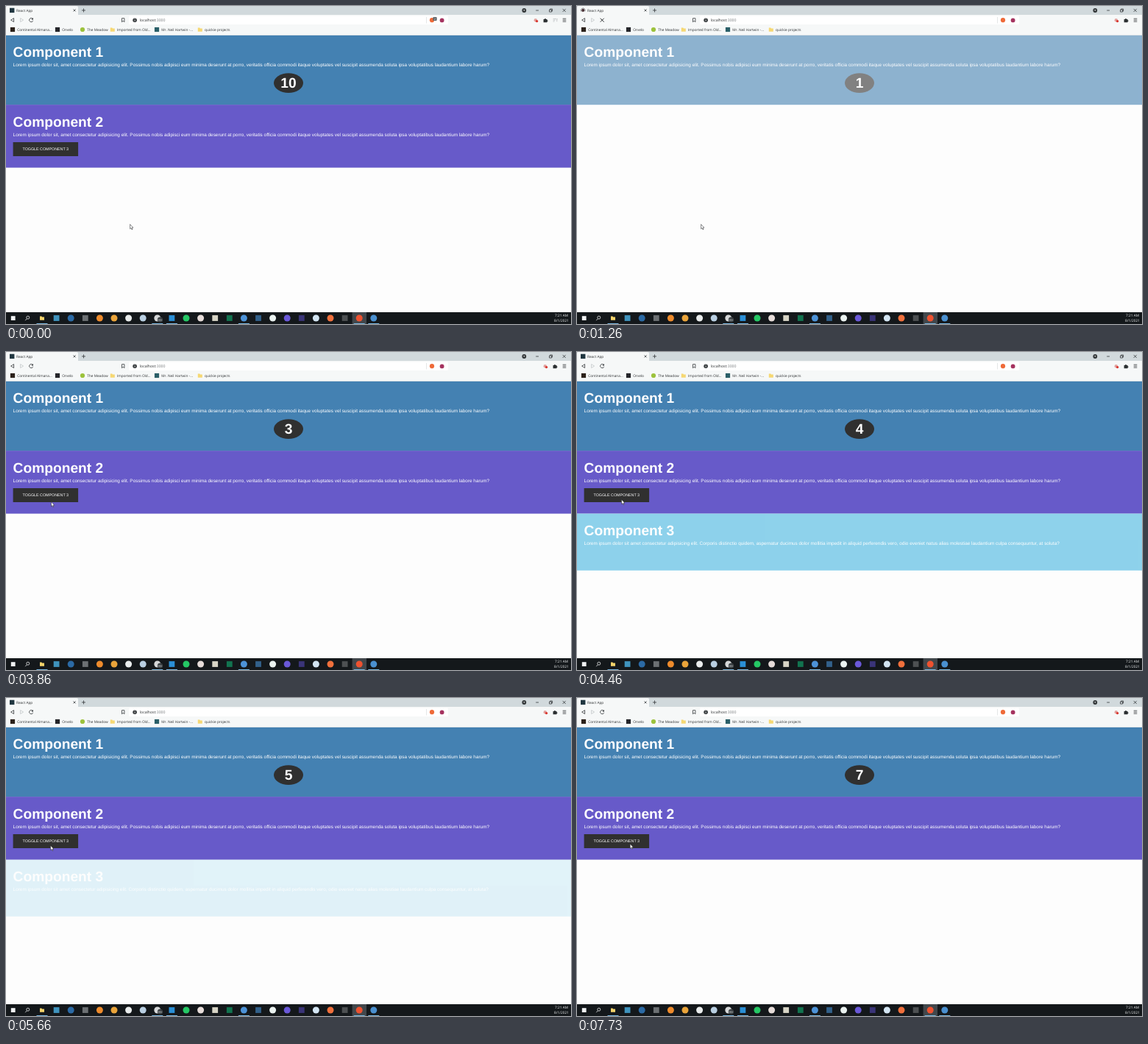
Recreate the animation shown at these times as an HTML page. Size 768x432 px, loop 8 s.

```html
<!DOCTYPE html>
<html lang="en">
<head>
<meta charset="utf-8">
<title>React App</title>
<style>
html, body { margin: 0; width: 100%; height: 100%; overflow: hidden; background: #fdfdfd; }
svg { display: block; width: 768px; height: 432px; text-rendering: geometricPrecision; }
.ui { font-family: "Open Sans", "Noto Sans", sans-serif; font-size: 4.75px; fill: #2c2f31; }
.page { font-family: "Liberation Sans", Arial, sans-serif; font-size: 6.4px; fill: #fff; }
.title { font-size: 19.2px; font-weight: bold; }
.line { fill: none; stroke: #34383a; stroke-width: .8; }
</style>
</head>
<body>
<svg viewBox="0 0 768 432">
  <rect width="768" height="432" fill="#fdfdfd"/>

  <g class="page">
    <g id="one">
      <rect y="39.6" width="768" height="94.6" fill="#4481b2"/>
      <text class="title" x="9.6" y="69.2">Component 1</text>
      <text class="lorem" x="9.6" y="82.3"></text>
      <ellipse cx="384" cy="104.6" rx="20" ry="13.3" fill="#303030"/>
      <text id="count" class="title" x="384" y="111.3" text-anchor="middle">10</text>
    </g>
    <g id="two">
      <rect y="134.1" width="768" height="85.5" fill="#675ac9"/>
      <text class="title" x="9.6" y="163.6">Component 2</text>
      <text class="lorem" x="9.6" y="176.7"></text>
      <rect x="9.6" y="185" width="88.5" height="19" fill="#303030"/>
      <text x="53.8" y="196.4" font-size="5.33" text-anchor="middle">TOGGLE COMPONENT 3</text>
    </g>
    <g id="three">
      <rect y="219.6" width="768" height="77.2" fill="#89d0eb"/>
      <text class="title" x="9.6" y="249.2">Component 3</text>
      <text x="9.6" y="262.3">Lorem ipsum dolor sit amet consectetur adipisicing elit. Corporis distinctio quidem, aspernatur ducimus dolor mollitia impedit in aliquid perferendis vero, odio eveniet natus alias molestiae laudantium culpa consequuntur, at soluta?</text>
    </g>
  </g>

  <g class="ui" id="browser">
    <rect width="768" height="12" fill="#d1d9dc"/>
    <path d="M0 12V2Q0 0 2 0H96Q98 0 98 2V12Z" fill="#f6f8f8"/>
    <rect y="12" width="768" height="27.6" fill="#f6f8f8"/>
    <rect y="39.1" width="768" height=".6" fill="#d9dddf"/>
    <rect x="167" y="13.6" width="434" height="11.4" rx="1.5" fill="#fff"/>
    <rect id="favicon" x="5" y="2.7" width="6.4" height="6.4" fill="#203640"/>
    <g id="spinner">
      <circle cx="8.2" cy="5.9" r="2" fill="#4a3035"/>
      <circle class="line" cx="8.2" cy="5.9" r="2.9" stroke-dasharray="12 7" style="stroke:#77797c"/>
    </g>
    <text x="14" y="7.7">React App</text>
    <path class="line" d="M91.6 4.4l3 3m0-3l-3 3M103 5.9h5m-2.5-2.5v5"/>
    <circle cx="704.3" cy="6" r="2.9" fill="#34383a"/>
    <path d="M703.1 5.2h2.4l-1.2 1.6z" fill="#fff"/>
    <path class="line" d="M720.2 6h3.8M738.6 5h3v3h-3zM739.6 5v-1h3v3h-1M756.7 3.9l4 4m0-4l-4 4"/>

    <path class="line" d="M10.6 16.6v5l-4-2.5z"/>
    <path class="line" d="M19.6 16.6v5l4-2.5z" style="stroke:#c3c7c9"/>
    <g id="reload">
      <path class="line" d="M36 17.2a2.6 2.6 0 1 0 .7 2.6"/>
      <path d="M37 15.9v2.7h-2.7z" fill="#34383a"/>
    </g>
    <path id="stop" class="line" d="M31.7 16.7l5 5m0-5l-5 5" style="stroke-width:1"/>
    <path class="line" d="M157.5 16.7h3.4v5l-1.7-1.4l-1.7 1.4z"/>
    <circle cx="175.1" cy="19.2" r="2.8" fill="#3b3f41"/>
    <path d="M175.1 17.4v.7m0 .7v2" stroke="#fff" stroke-width=".7"/>
    <text x="181.8" y="21.2" font-size="5.15">localhost<tspan fill="#777b7d">:3000</tspan></text>
    <path d="M571.5 15v8.5" stroke="#d2d5d7" stroke-width=".6"/>
    <circle cx="579" cy="19.2" r="3.1" fill="#ef6a38"/>
    <circle cx="592.6" cy="19.4" r="2.9" fill="#a5325f"/>
    <g id="badge">
      <rect x="580.4" y="14.9" width="5.2" height="5.2" rx="1" fill="#5d6468"/>
      <text x="583" y="19" font-size="4" text-anchor="middle" style="fill:#fff">2</text>
    </g>
    <g id="extensions">
      <circle cx="719.8" cy="19.2" r="2.2" fill="#e3a3a0"/>
      <circle cx="721.6" cy="20.6" r="1.7" fill="#d8372f"/>
      <path d="M730.6 17.9h1.4a1 1 0 1 1 2 0h1.5v1.4a1 1 0 1 1 0 2v1h-4.9z" fill="#2c3032"/>
    </g>
    <path id="media" class="line" d="M743.6 17.4h4.4m-4.4 1.8h3m-3 1.8h2m3.2.2v-3.6h1" style="stroke:#b9bdbf"/>
    <path class="line" d="M756.7 17.2h4.6m-4.6 2h4.6m-4.6 2h4.6"/>
  </g>

  <g class="ui" id="status">
    <path d="M0 407.2H254Q255.4 407.2 255.4 409V416H0Z" fill="#d6dfe3"/>
    <text x="2" y="413.6">Connecting...</text>
  </g>

  <g class="ui" id="taskbar">
    <rect y="416" width="768" height="16" fill="#14181b"/>
    <rect x="470.6" y="416" width="19.4" height="16" fill="#42474b"/>
    <rect x="6.8" y="421.2" width="5.8" height="5.8" fill="#f1f3f4"/>
    <g class="line" style="stroke:#eceeef"><circle cx="29.8" cy="423.2" r="2"/><path d="M28.4 424.8l-2.2 2.4"/></g>
  </g>

  <path id="cursor" d="M0 0V6.2L1.4 5L2.4 7.2L3.4 6.8L2.4 4.6H4.3Z" fill="#fff" stroke="#25282b" stroke-width=".55"/>
</svg>
<script>
const $ = id => document.getElementById(id);
const LOOP = 8000;

function add(parent, tag, attrs, text = '') {
  const node = document.createElementNS(parent.namespaceURI, tag);
  for (const [key, value] of Object.entries(attrs)) node.setAttribute(key, value);
  node.textContent = text;
  parent.append(node);
  return node;
}

const lorem = 'Lorem ipsum dolor sit, amet consectetur adipisicing elit. Possimus nobis adipisci eum minima deserunt at porro, veritatis officia commodi itaque voluptates vel suscipit assumenda soluta ipsa voluptatibus laudantium labore harum?';
document.querySelectorAll('.lorem').forEach(node => node.textContent = lorem);

function folder(parent, x, y, fill) {
  add(parent, 'path', { d: `M${x - 3} ${y - 2.6}h2.4l.8 1h2.8v4.4h-6z`, fill });
}

function icon(parent, shape, x, y, size, fill) {
  if (shape === 'folder') folder(parent, x, y, fill);
  else if (shape === 'circle') add(parent, 'circle', { cx: x, cy: y, r: size / 2, fill });
  else add(parent, 'rect', { x: x - size / 2, y: y - size / 2, width: size, height: size, fill });
}

const bookmarks = [
  [9, 'square', '#2b211a', 'Continental Almana...'],
  [70, 'square', '#25262a', 'Orvelo'],
  [104, 'circle', '#9cc23c', 'The Meadow'],
  [144.8, 'folder', '#f6d873', 'Imported from Old...'],
  [205, 'square', '#2a5f68', 'Mr. Neil Hartwin -...'],
  [263.8, 'folder', '#f6d873', 'quickie projects'],
];
for (const [x, shape, color, label] of bookmarks) {
  icon($('browser'), shape, x, 32, 6.2, color);
  add($('browser'), 'text', { x: x + 6.2, y: 33.8 }, label);
}

// Taskbar apps from left to right: shape and colour.
const apps = [
  'folder #f5d36b', 'square #3f93bd', 'circle #2b6aa5', 'square #6c7073', 'circle #ee8b2c',
  'circle #eaa43a', 'circle #e9ecec', 'circle #b9cfe2', 'circle #d5d7d8', 'square #2a8fd6',
  'circle #25c865', 'circle #e6dcd9', 'square #d8d5c6', 'square #12744f', 'circle #4d93d8',
  'square #32618b', 'circle #eaf2f0', 'circle #6a58d8', 'square #3a3478', 'circle #d3e5f3',
  'circle #f0703c', 'square #4d5052', 'circle #ee5230', 'circle #4a90d0',
];
const running = [0, 8, 9, 14, 22, 23];
apps.forEach((app, i) => {
  const [shape, color] = app.split(' ');
  const x = 49 + i * 19.6;
  icon($('taskbar'), shape, x, 424, shape === 'circle' ? 9 : 7.8, color);
  if (running.includes(i))
    add($('taskbar'), 'rect', { x: x - 7.5, y: 431, width: 15, height: 1, fill: '#79b6df' });
});
const light = { 'text-anchor': 'middle', style: 'fill:#f2f4f5' };
add($('taskbar'), 'circle', { cx: 209.5, cy: 426.2, r: 3.6, fill: '#3c4144' });
add($('taskbar'), 'text', { x: 209.5, y: 427.6, 'font-size': 3.6, ...light }, '99+');
add($('taskbar'), 'text', { x: 755, y: 422.3, ...light }, '7:21 AM');
add($('taskbar'), 'text', { x: 755, y: 429.3, ...light }, '8/1/2021');

const progress = (t, start, length) => Math.min(1, Math.max(0, (t - start) / length));
const expoOut = x => x >= 1 ? 1 : 1 - 2 ** (-10 * x);
const softOut = x => x * (1.4 - .4 * x);
const smooth = x => x * x * (3 - 2 * x);
const show = (id, on) => $(id).style.display = on ? '' : 'none';

// Pointer stops: time, x, y.
const path = [
  [0, 168.6, 296.6], [3220, 168.6, 296.6], [3860, 61.5, 203.6], [4000, 60.6, 200.4],
  [6760, 60.6, 200.4], [7700, 72.2, 198.2], [LOOP, 72.2, 198.2],
];
function pointer(t) {
  const i = path.findIndex(stop => stop[0] > t);
  const [from, x, y] = path[i - 1], [to, x2, y2] = path[i];
  const k = smooth(progress(t, from, to - from));
  return [x + (x2 - x) * k, y + (y2 - y) * k];
}

function render(t) {
  const before = t < 200;
  const loading = t >= 60 && t < 1400;
  const mounted = t >= 1200;

  $('one').style.opacity = before ? 1 : expoOut(progress(t, 1200, 460));
  $('two').style.opacity = before ? 1 : softOut(progress(t, 1760, 1200));
  $('three').style.opacity = expoOut(progress(t, 4100, 800)) - expoOut(progress(t, 5500, 800));
  $('count').textContent = before ? 10 : Math.max(1, Math.floor((t - 259) / 1000));

  show('favicon', !loading);
  show('spinner', loading);
  show('reload', !loading);
  show('stop', loading);
  show('status', !before && !mounted);
  show('badge', before);
  show('media', !mounted);
  $('spinner').setAttribute('transform', `rotate(${t * .4} 8.2 5.9)`);
  $('extensions').setAttribute('transform', `translate(${mounted ? 13 : 0})`);
  $('cursor').setAttribute('transform', `translate(${pointer(t)})`);
}

const started = performance.now();
function frame() {
  render((performance.now() - started) % LOOP);
  requestAnimationFrame(frame);
}
frame();
</script>
</body>
</html>
```
